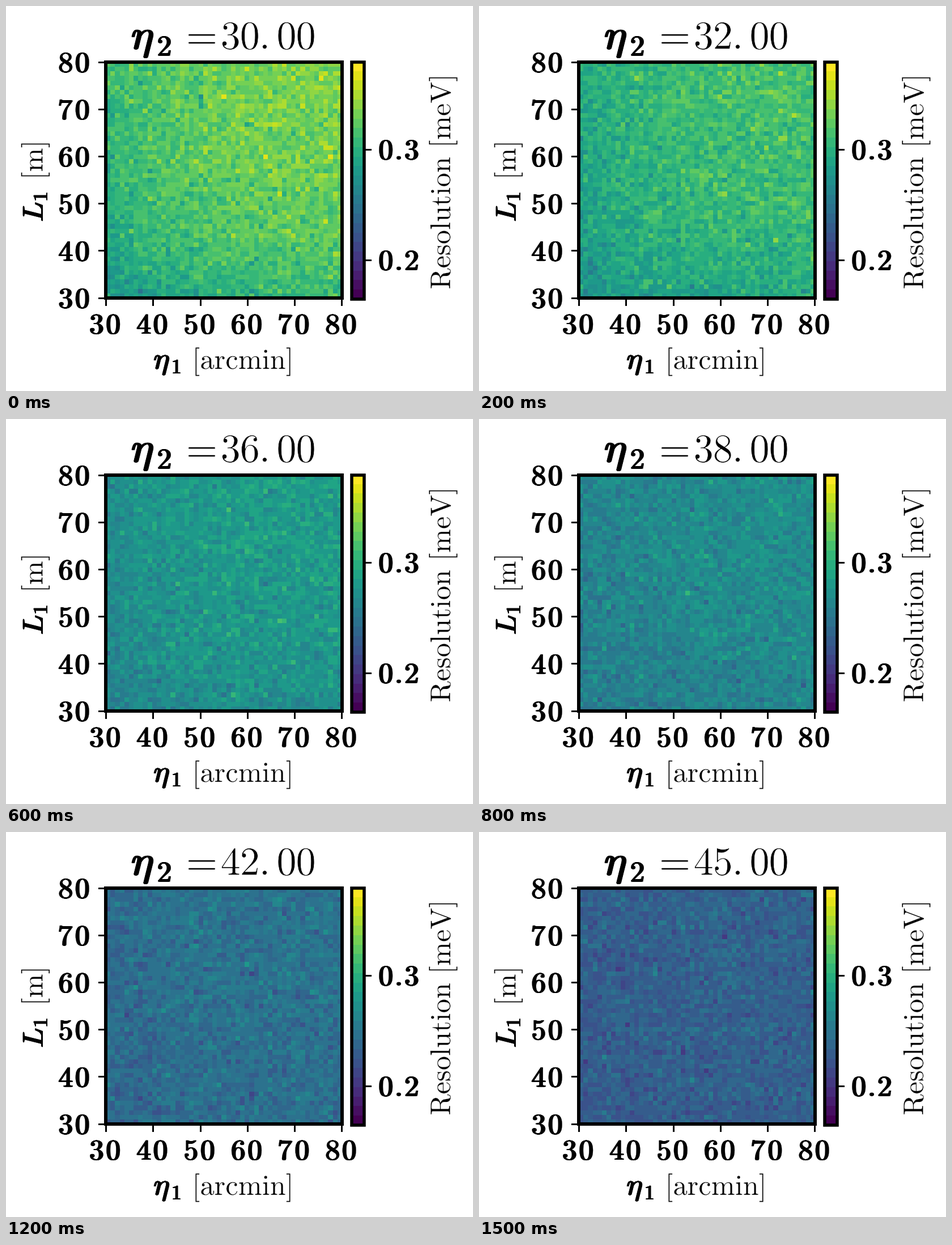
Animation, 824 px wide and 679 px high, one loop 1.6 s. Source, as a matplotlib script:

```python
import numpy as np
import matplotlib.pyplot as plt
from matplotlib.animation import FuncAnimation
from matplotlib.patches import PathPatch, Rectangle
from matplotlib.path import Path
from matplotlib.textpath import TextPath
from matplotlib.transforms import Affine2D

W, H, DPI = 824, 679, 64
FRAMES, INTERVAL = 16, 100
LEFT, RIGHT, TOP, BOTTOM = 176.5, 593, 99, 515
BAR_L, BAR_R, BAR_T, BAR_B = 610.5, 632.5, 98.5, 517
VMIN, VMAX = 0.165, 0.3795
CELLS, LEVELS = 51, 25
LABEL_EM, TITLE_EM = 50.5, 71
START, MID, END = 0, 0.5, 1

plt.rcParams["mathtext.fontset"] = "cm"
fig = plt.figure(figsize=(W / DPI, H / DPI), dpi=DPI, facecolor="white")
ax = fig.add_axes([0, 0, 1, 1])
ax.axis("off")


def px(v):
    """Pixels to points."""
    return v * 72 / DPI


def widen(path, smear):
    """Union of sideways copies, which thickens the stems."""
    shifts = np.linspace(-smear / 2, smear / 2, 3)
    copies = [Path(path.vertices + [d, 0], path.codes) for d in shifts]
    return Path.make_compound_path(*copies)


def ink(tex, em, x, y, align=MID, angle=0, smear=0, edge=0, color="black"):
    """Place math text by its ink along the baseline through (x, y)."""
    path = TextPath((0, 0), f"${tex}$", size=em)
    if smear:
        path = widen(path, smear)
    box = path.get_extents()
    place = (Affine2D().translate(-box.x0 - align * box.width, 0)
             .rotate_deg(angle).scale(1, -1).translate(x, y))
    patch = PathPatch(place.transform_path(path), facecolor="black",
                      edgecolor=color, linewidth=px(edge), zorder=4)
    return ax.add_patch(patch)


def light(tex, em, x, y, thin=0.35, **kw):
    return ink(rf"\mathrm{{{tex}}}", em, x, y, edge=thin, color="white", **kw)


def bold(text, em, x, y, **kw):
    """Bold digits on an extended pitch, centred on x."""
    pitch = [em * (0.319 if c == "." else 0.575) for c in text]
    pen = x - sum(pitch) / 2
    for c, step in zip(text, pitch):
        ink(rf"\mathbf{{{c}}}", em, pen + step / 2, y,
            smear=0.045 * em, edge=0.3, **kw)
        pen += step


def bold_italic(tex, em, x, y, **kw):
    ink(tex, em, x, y, align=START, smear=0.034 * em, edge=0.012 * em, **kw)


def block(x, y, w, h):
    ax.add_patch(Rectangle((x, y), w, h, color="black", lw=0, zorder=3))


def frame(x0, y0, x1, y1, width):
    ax.add_patch(Rectangle((x0, y0), x1 - x0, y1 - y0, fill=False,
                           ec="black", lw=px(width), joinstyle="miter",
                           zorder=3))


def resolution(eta2):
    """Noisy resolution map, first row at the largest length."""
    axis = np.linspace(0, 50, CELLS)
    rise = 1 - np.exp(-axis / 15)
    shape = (rise[None, :] + rise[::-1, None]) / 1.93 - 0.8
    ratio = 30 / eta2
    noise = np.random.default_rng(eta2).normal(0, 1, (CELLS, CELLS))
    return (0.322 * ratio ** 0.8 + 0.06 * ratio ** 5 * shape
            + 0.011 * ratio ** 0.5 * noise)


viridis = plt.get_cmap("viridis", LEVELS)
image = dict(cmap=viridis, aspect="auto", interpolation="nearest")
heat = ax.imshow(resolution(30), vmin=VMIN, vmax=VMAX,
                 extent=(LEFT, RIGHT, BOTTOM, TOP), **image)
ax.imshow(np.arange(LEVELS)[::-1, None],
          extent=(BAR_L, BAR_R, BAR_B, BAR_T), **image)
ax.set_xlim(0, W)
ax.set_ylim(H, 0)

frame(LEFT, TOP, RIGHT, BOTTOM, 6)
frame(BAR_L, BAR_T, BAR_R, BAR_B, 5.5)

for i in range(6):
    name = str(30 + 10 * i)
    x = LEFT + (RIGHT - LEFT) * i / 5
    y = BOTTOM + (TOP - BOTTOM) * i / 5
    block(x - 1.5, BOTTOM, 3, 13.5)
    block(LEFT - 13.5, y - 1.5, 13.5, 3)
    bold(name, 51, x - 2, 578)
    bold(name, 51, 120, y + 17.5)

for name, y in (("0.3", 253.5), ("0.2", 448.5)):
    block(BAR_R, y - 1.5, 12.5, 3)
    bold(name, 51, 693, y + 17)

bold_italic(r"\eta", 53.5, 261, 640)
bold("1", 36, 301, 648)
light("[arcmin]", LABEL_EM, 418, 640)

bold_italic("L", LABEL_EM, 65, 379, angle=90)
ink(r"\mathbf{1}", 36, 73, 336, angle=90, smear=1.6, edge=0.3)
light("[m]", LABEL_EM, 64.5, 271.5, angle=90)
light("Resolution", LABEL_EM, 784, 382.5, angle=90)
light("[meV]", LABEL_EM, 784, 185, angle=90)

bold_italic(r"\eta", 75, 222, 76)
bold("2", 51, 279.5, 87.5)
light("=", TITLE_EM, 345.5, 76)


def title_value(eta2):
    tight = r"\hspace{-0.023}".join(f"{eta2}.00")
    return light(tight, TITLE_EM, 544, 76, thin=0.8, align=END)


titles = [title_value(30 + i) for i in range(FRAMES)]


def draw(i):
    heat.set_data(resolution(30 + i))
    for k, title in enumerate(titles):
        title.set_visible(k == i)
    return [heat, *titles]


anim = FuncAnimation(fig, draw, frames=FRAMES, interval=INTERVAL,
                     repeat=True, repeat_delay=0, blit=False)
plt.show()
```
